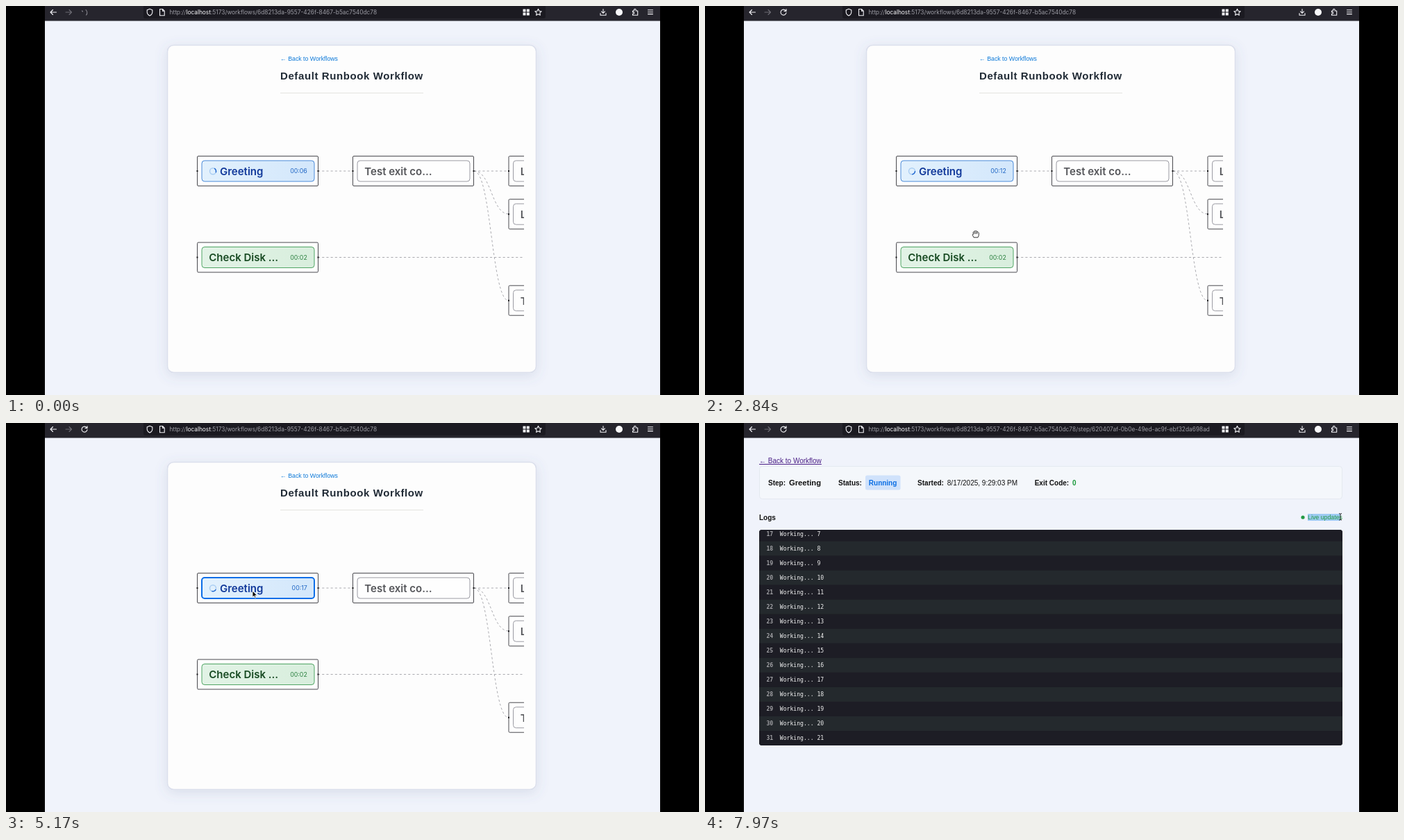
An HTML page for the animation above (8 s loop, 998x561 px).

```html
<!DOCTYPE html>
<html lang="en">
<head>
<meta charset="utf-8">
<title>Runbook workflow</title>
<style>
  html, body { margin: 0; width: 100%; height: 100%; overflow: hidden; background: #000; }
  svg { display: block; width: 100%; height: 100%; }
  text { white-space: pre; font: 10px "Liberation Sans", Arial, sans-serif; fill: #111; }
  .b { font-weight: 700; }
  .end { text-anchor: end; }
  .url { font: 8.34px Inter, sans-serif; fill: #9d9da5; }
  .url .host { fill: #fbfbfe; }
  .back { font-size: 8.75px; fill: #0b78d8; }
  .title { font-size: 15px; font-weight: 700; letter-spacing: .6px; fill: #212b36; }
  .label { font: 600 15px Inter, sans-serif; }
  .timer { font: 8.8px Inter, sans-serif; text-anchor: end; }
  .name { font-size: 11.2px; font-weight: 700; }
  .live { font-size: 8.8px; text-anchor: end; }
  .log { font: 8.1px "DejaVu Sans Mono", monospace; fill: #f2f2f2; }
  .num { font-weight: 700; fill: #a0a0a4; text-anchor: end; }
  .icon { fill: none; stroke: #f4f4f8; stroke-width: 1.1; stroke-linecap: round; stroke-linejoin: round; }
  .edge { fill: none; stroke: #96969c; stroke-width: .8; stroke-dasharray: 3.1 3.1; }
  .outer { fill: #fff; stroke: #35353a; stroke-width: .9; }
</style>
</head>
<body>
<svg viewBox="0 0 998 561" preserveAspectRatio="none">
  <defs>
    <linearGradient id="blue"><stop stop-color="#e2f1fd"/><stop offset="1" stop-color="#d3e7fb"/></linearGradient>
    <linearGradient id="green"><stop stop-color="#e2f3e6"/><stop offset="1" stop-color="#d8eedd"/></linearGradient>
    <filter id="shadow" x="-10%" y="-10%" width="120%" height="120%">
      <feDropShadow dx="0" dy="4" stdDeviation="9" flood-color="#5b6b95" flood-opacity=".16"/>
    </filter>
    <clipPath id="pane"><rect x="249" y="140" width="497" height="375"/></clipPath>
    <clipPath id="panel"><rect x="78" y="154" width="840" height="311" rx="4"/></clipPath>
    <clipPath id="shortPanel"><rect x="78" y="154" width="840" height="187" rx="4"/></clipPath>
  </defs>

  <rect width="998" height="561"/>
  <rect x="56" y="21" width="886" height="540" fill="#f0f3fb"/>
  <rect x="56" width="886" height="21.5" fill="#26252d"/>
  <rect x="198" y="-4" width="579" height="22" rx="3" fill="#1b1a21"/>

  <g class="icon">
    <path d="M72.500 9H64M67.500 5.500L64 9l3.500 3.500"/>
    <path d="M86 9h8.500M91 5.500L94.500 9 91 12.500" stroke="#6d6c74"/>
    <path id="reload" d="M116.300 6.800A4 4 0 1 0 117 9.500M117 4.500v3h-3"/>
    <path id="loading" d="M115 5.500Q118.500 9.500 115.500 13M109.500 7l1 1" stroke="#8a8992"/>
    <path d="M207 4.300l3.800 1.400v3q0 3.500-3.800 5.200-3.800-1.700-3.800-5.200v-3z"/>
    <path d="M221.500 4.500h4l2.700 2.700v6.500h-6.700zM225.500 4.500v2.700h2.700"/>
    <path d="M766.500 4.300l1.400 3 3.300.4-2.400 2.300.6 3.300-2.900-1.600-2.900 1.600.6-3.300-2.400-2.300 3.300-.4z"/>
    <path d="M860 4.500v5.500M857.500 7.800l2.500 2.500 2.500-2.500M856 10.500v2.800h8v-2.800"/>
    <path d="M902.500 7h2V5.500a1.300 1.300 0 0 1 2.600 0V7h2.600v6.300h-7.200v-2h1a1.200 1.200 0 0 0 0-2.400h-1z"/>
    <path d="M924.500 5.800h7M924.500 8.700h7M924.500 11.600h7"/>
  </g>
  <path d="M744.500 4.500h4v4h-4zM749.800 4.500h4v4h-4zM744.500 9.500h4v4h-4zM749.800 9.500h4v4h-4z" fill="#f4f4f8"/>
  <circle cx="883" cy="9" r="5" fill="#f8f8fa"/>
  <text class="url" x="235.500" y="12">http://<tspan class="host">localhost</tspan>:5173/workflows/6d8213da-9557-426f-8467-b5ac7540dc78<tspan id="path"></tspan></text>

  <g id="flow">
    <rect x="232.500" y="56.500" width="531" height="472" rx="9" fill="#fdfdfd" stroke="#dbdfec" stroke-width="1.500" filter="url(#shadow)"/>
    <text class="back" x="395" y="79">← Back to Workflows</text>
    <text class="title" x="395" y="106">Default Runbook Workflow</text>
    <path d="M395 125.500h206" stroke="#e4e4e0"/>
    <g id="graph" clip-path="url(#pane)"></g>
  </g>
  <g id="step"></g>

  <g id="arrow"><path d="M0 0V9.300L2.200 7.300 3.600 10.500 5 9.900 3.700 6.800H6.600Z" fill="#0c0c0c" stroke="#fff" stroke-width=".8"/></g>
  <g id="grab"><path d="M-3 4.800L-4.800 1.200Q-4.900 0-3.600.4L-3.800-2.800Q-3.300-4-2.300-3L-2-4.300Q-1-5.300-.3-4.300 .8-5.300 1.500-4.200L1.700-3.300Q3-4 3.500-2.800L4.300-1.800Q4.800 2.500 3 4.800ZM-1.800-2.800V-.3M0-3.500V-.3M1.900-3V-.3" fill="#fff" stroke="#222" stroke-width=".9" stroke-linejoin="round"/></g>
  <g id="ibeam"><path d="M-2-4.500Q0-4.500 0-3.300 0-4.500 2-4.500M0-3.300V3.800M-2 5Q0 5 0 3.800 0 5 2 5" fill="none" stroke="#1a1a1a" stroke-width=".9"/></g>
</svg>

<script>
const LOOP = 8000, SPEED = 2.13, ROW = 21.04;
const OPEN_DISK = 3300, BACK = 4140, OPEN_GREETING = 5420, SELECT = 7350;
const $ = id => document.getElementById(id);
const show = (el, on) => el.setAttribute('display', on ? 'inline' : 'none');
const text = (cls, x, y, str, extra = '') => `<text class="${cls}" x="${x}" y="${y}" ${extra}>${str}</text>`;
const rect = (x, y, w, h, r, extra) => `<rect x="${x}" y="${y}" width="${w}" height="${h}" rx="${r}" ${extra}/>`;

// Workflow graph
const themes = {
  idle: { fill: '#fefefe', line: '#9a9aa2', ink: '#55565a' },
  running: { fill: 'url(#blue)', line: '#4a8ad8', ink: '#10389a', time: '#1f66c4', hover: '#0d6ee8' },
  done: { fill: 'url(#green)', line: '#4fa463', ink: '#174a22', time: '#2c8040', hover: '#28a745' }
};
function node(x, y, label, kind, id = '') {
  const c = themes[kind], spin = kind === 'running';
  return `<g>${rect(x, y, 174, 43, 1.5, 'class="outer"')}
    ${rect(x + 6.5, y + 6.5, 162, 30, 4, `id="${id}Box" fill="${c.fill}" stroke="${c.line}"`)}
    ${text('label', x + (spin ? 32.5 : 16.8), y + 27.4, label, `style="fill:${c.ink}"`)}
    ${c.time ? text('timer', x + 158.3, y + 24.8, '00:02', `id="${id}Time" style="fill:${c.time}"`) : ''}
    ${spin ? `<g fill="none" stroke-width="1.4"><circle cx="${x + 22.5}" cy="${y + 21.7}" r="4.500" stroke="#a9cdf2"/>
      <path id="spinner" d="M${x + 25.7} ${y + 18.5}a4.500 4.500 0 0 1 0 6.400" stroke="#1f66d0"/></g>` : ''}
    <path d="M${x - 1} ${y + 20.5}h2v2h-2zM${x + 173} ${y + 20.5}h2v2h-2z" fill="#161618"/></g>`;
}
$('graph').innerHTML =
  '<path class="edge" d="M449 238H500M674 238H724M674 238C699 238 699 300 724 300M674 238C699 238 699 425 724 425M449 362.500H746"/>' +
  node(275.5, 216.5, 'Greeting', 'running', 'greet') +
  node(275.5, 341, 'Check Disk …', 'done', 'disk') +
  node(499.5, 216.5, 'Test exit co…', 'idle') +
  [['L', 216.5], ['L', 278.7], ['T', 403.2]].map(([s, y]) => node(724, y, s, 'idle')).join('');

// Step pages
const disk = {
  path: '/step/a609cc81-433c-41b7-af56-ea75b769243d',
  name: 'Check Disk Space', status: 'Success', ink: '#1b9a3c', badge: '#d4eddc',
  shift: 0, dot: 850.2, live: 'Step completed', liveInk: '#636b76', height: 187, clip: 'shortPanel'
};
const greeting = {
  path: '/step/620407af-0b0e-49ed-ac9f-ebf32da698ad',
  name: 'Greeting', status: 'Running', ink: '#0c6fe4', badge: '#d0e2fb',
  shift: -50.5, dot: 861, live: 'Live updates', liveInk: '#239a44', height: 311, clip: 'panel'
};
const mounts = [
  ['Filesystem', 'Size', 'Used', 'Avail', 'Use%', 'Mounted on'],
  ['overlay', '1007G', '98G', '859G', '11%', '/'],
  ['tmpfs', '64M', '0', '64M', '0%', '/dev'],
  ['/dev/vda1', '1007G', '98G', '859G', '11%', '/home/demo'],
  ['shm', '64M', '0', '64M', '0%', '/dev/shm'],
  ['tmpfs', '128M', '12K', '128M', '1%', '/run/secrets/kubernetes.io/serviceaccount'],
  ['tmpfs', '3.9G', '0', '3.9G', '0%', '/proc/acpi'],
  ['tmpfs', '3.9G', '0', '3.9G', '0%', '/sys/firmware']
].map(([fs, size, used, avail, use, mount]) =>
  fs.padEnd(14) + size.padStart(6) + used.padStart(6) + avail.padStart(6) + use.padStart(5) + ' ' + mount);

function logRow(n, y, str) {
  return rect(78, y - ROW / 2, 840, ROW, 0, `fill="${n % 2 ? '#1d1d25' : '#24292d'}"`) +
    text('log num', 98.2, y + 2.9, n) + text('log', 107.8, y + 2.9, str);
}
function stepPage(p, rows) {
  const s = p.shift;
  return text('', 78, 58, '← Back to Workflow', 'style="fill:#4b1f86;text-decoration:underline"') +
    rect(78.5, 62.5, 839, 47, 4, 'fill="#f4f7fb" stroke="#e4e9f0"') +
    text('b', 91, 89.5, 'Step:') + text('name', 121, 89.8, p.name) +
    text('b', 242.5 + s, 89.5, 'Status:') +
    rect(281.5 + s, 75.5, 50.5, 21, 2.5, `fill="${p.badge}"`) +
    text('b', 286.3 + s, 89.5, p.status, `style="fill:${p.ink}"`) +
    text('b', 356.6 + s, 89.5, 'Started:') + text('', 399.3 + s, 89.5, '8/17/2025, 9:29:03 PM') +
    text('b', 525.2 + s, 89.5, 'Exit Code:') + text('b', 579.5 + s, 89.5, '0', 'style="fill:#1b9a3c"') +
    text('b', 78, 139.5, 'Logs') +
    rect(868, 131, 0, 10, 0, 'id="selection" fill="#9ecbf3"') +
    `<circle cx="${p.dot}" cy="136" r="2.600" fill="${p.liveInk}"/>` +
    text('live', 918, 139.2, p.live, `style="fill:${p.liveInk}"`) +
    `<g clip-path="url(#${p.clip})">${rect(78, 154, 840, p.height, 0, 'fill="#1d1c1f"')}${rows}</g>`;
}
const diskRows = mounts.map((m, i) => logRow(i + 1, 164.3 + i * ROW, m)).join('');
function workRows(last) {
  let out = '';
  for (let i = 0; i < 15; i++) {
    const n = last - 14 + i;
    out += logRow(n, 160 + i * ROW, 'Working... ' + (n - 10));
  }
  return out;
}

// Pointer path: time, x, y
const track = [
  [1450, 442, -14], [1780, 435, 136], [1900, 435, 138], [2650, 390, 326], [2850, 390, 329], [3180, 382, 364],
  [3350, 382, 364], [3550, 382, 373], [3650, 382, 373], [4050, 120, 52], [4200, 120, 52], [5050, 355, 242],
  [6350, 355, 242], [7100, 868, 135], [SELECT, 868, 135], [7930, 915, 135], [LOOP, 915, 135]
];
function pointer(t) {
  if (t <= track[0][0]) return [-50, -50];
  const i = track.findIndex(k => k[0] >= t);
  const [t0, x0, y0] = track[i - 1], [t1, x1, y1] = track[i];
  const u = (t - t0) / (t1 - t0), e = u * u * (3 - 2 * u);
  return [x0 + (x1 - x0) * e, y0 + (y1 - y0) * e];
}
const inside = (x, y, l, top, r, bottom) => x > l && x < r && y > top && y < bottom;

function hoverBox(id, kind, on) {
  const box = $(id + 'Box'), c = themes[kind];
  box.setAttribute('stroke', on ? c.hover : c.line);
  box.setAttribute('stroke-width', on ? 2 : 1);
}

let shown = '';
function draw(t) {
  const sec = t / 1000 * SPEED;
  const page = t >= OPEN_GREETING ? greeting : t >= OPEN_DISK && t < BACK ? disk : null;
  const [x, y] = pointer(t);
  const lines = Math.floor(14.3 + sec);
  const key = page ? page.name + (page === greeting ? lines : '') : 'flow';

  if (key !== shown) {
    shown = key;
    show($('flow'), !page);
    $('path').textContent = page ? page.path : '';
    $('step').innerHTML = page ? stepPage(page, page === disk ? diskRows : workRows(lines)) : '';
  }
  show($('loading'), t < 200);
  show($('reload'), t >= 200);

  const onGreet = inside(x, y, 275, 216, 450, 260), onDisk = inside(x, y, 275, 341, 450, 384);
  if (!page) {
    $('greetTime').textContent = '00:' + String(Math.floor(6.3 + sec)).padStart(2, '0');
    $('spinner').setAttribute('transform', `rotate(${t / 460 * 360 - 20} 298 238.2)`);
    hoverBox('greet', 'running', onGreet);
    hoverBox('disk', 'done', onDisk);
  } else if (page === greeting) {
    $('selection').setAttribute('width', t > SELECT ? Math.max(0, x - 868) : 0);
  }

  const kind = page ? (inside(x, y, 866, 128, 920, 143) ? 'ibeam' : 'arrow')
    : inside(x, y, 249, 145, 746, 512) && !onGreet && !onDisk ? 'grab' : 'arrow';
  for (const id of ['arrow', 'grab', 'ibeam']) show($(id), id === kind);
  $(kind).setAttribute('transform', `translate(${x} ${y})`);
}

const start = performance.now();
function tick() {
  draw((performance.now() - start) % LOOP);
  requestAnimationFrame(tick);
}
tick();
</script>
</body>
</html>
```
